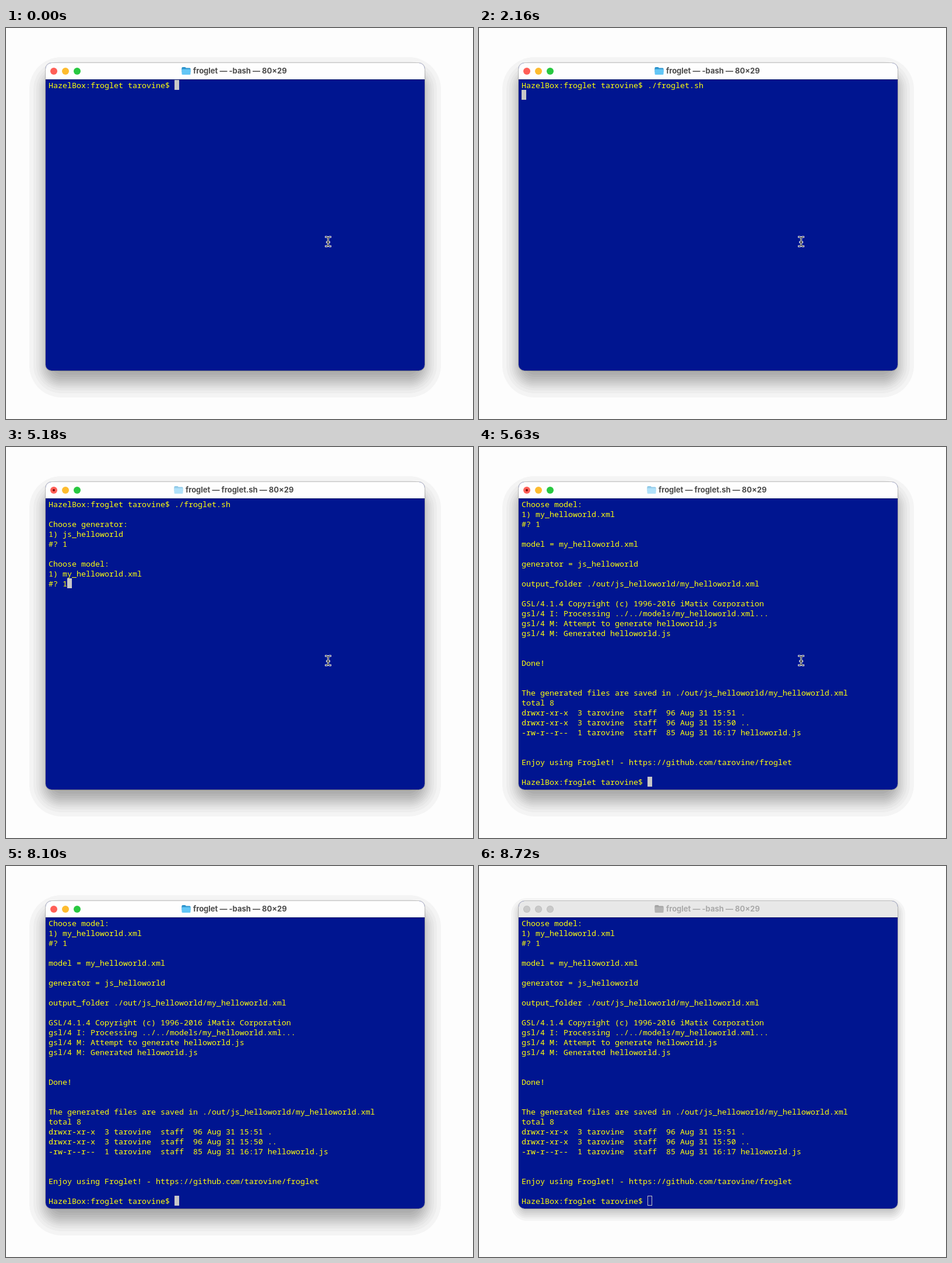
Recreate the animation shown at these times as an HTML page with a canvas. Size 801 by 670 pixels, loop 8820 ms.

```html
<!DOCTYPE html>
<html lang="en">
<head>
<meta charset="utf-8">
<title>Terminal session</title>
<style>
  html, body { margin: 0; width: 100%; height: 100%; overflow: hidden; background: #fdfdfd; }
  canvas { display: block; }
</style>
</head>
<body>
<canvas id="stage" width="801" height="670"></canvas>
<script>
const ctx = document.getElementById('stage').getContext('2d');
const LOOP = 8820, ROWS = 29, COL = 8, ROW = 17;
const WIN = { x: 68, y: 60, w: 650, h: 527, bar: 28, r: 10 };
const TEXT = { x: 73, y: 89 };
const PROMPT = 'HazelBox:froglet tarovine$ ';

// Text that reaches the terminal at each time
const OUTPUT = [
  [0, PROMPT],
  [720, '.'], [900, '/'], [1260, 'f'], [1440, 'r'], [1710, 'oglet.sh '],
  [2160, '\n'],
  [2250, '\nChoose generator:\n1) js_helloworld\n#? '],
  [3600, '1'],
  [4320, '\n\nChoose model:\n1) my_helloworld.xml\n#? '],
  [5180, '1'],
  [5630, `

model = my_helloworld.xml

generator = js_helloworld

output_folder ./out/js_helloworld/my_helloworld.xml

GSL/4.1.4 Copyright (c) 1996-2016 iMatix Corporation
gsl/4 I: Processing ../../models/my_helloworld.xml...
gsl/4 M: Attempt to generate helloworld.js
gsl/4 M: Generated helloworld.js


Done!


The generated files are saved in ./out/js_helloworld/my_helloworld.xml
total 8
drwxr-xr-x  3 tarovine  staff  96 Aug 31 15:51 .
drwxr-xr-x  3 tarovine  staff  96 Aug 31 15:50 ..
-rw-r--r--  1 tarovine  staff  85 Aug 31 16:17 helloworld.js


Enjoy using Froglet! - https://github.com/tarovine/froglet

${PROMPT}`],
];

function rounded(x, y, w, h, r) {
  ctx.beginPath();
  ctx.roundRect(x, y, w, h, r);
}

function disc(x, y, r, color) {
  ctx.beginPath();
  ctx.arc(x, y, r, 0, Math.PI * 2);
  ctx.fillStyle = color;
  ctx.fill();
}

// Stepped shadow: nested rounded boxes that darken inwards
function drawShadow(spreads, drop, corner, step) {
  spreads.forEach((s, i) => {
    const shade = 244 - i * step;
    rounded(WIN.x - s, WIN.y + drop - s, WIN.w + 2 * s, WIN.h + 2 * s, corner + s);
    ctx.fillStyle = `rgb(${shade},${shade},${shade})`;
    ctx.fill();
  });
}

function drawFolder(x, back, front) {
  ctx.fillStyle = back;
  rounded(x, 67, 7, 5, 1.5);
  ctx.fill();
  rounded(x, 68.5, 15, 8, 1.5);
  ctx.fill();
  ctx.fillStyle = front;
  rounded(x, 70.5, 15, 9.5, 1.5);
  ctx.fill();
}

function drawTitleBar(running, active) {
  const lights = active ? ['#ff5f57', '#febc2e', '#28c840'] : Array(3).fill('#c9c9c9');
  lights.forEach((color, i) => {
    disc(82 + 20 * i, 74, 6, active ? color : '#b9b9b9');
    if (!active) disc(82 + 20 * i, 74, 5.2, color);
  });
  if (running) disc(82, 74, 2, '#7c0808');

  const x = running ? 288.5 : 301.5;
  if (!active) drawFolder(x, '#a4a4a4', '#b4b4b4');
  else if (running) drawFolder(x, '#93cbe9', '#b0e1fa');
  else drawFolder(x, '#2d94cd', '#62c6f6');

  ctx.font = '700 13px Inter, sans-serif';
  ctx.fillStyle = active ? '#4b4b4b' : '#a9a9a9';
  ctx.fillText(`froglet — ${running ? 'froglet.sh' : '-bash'} — 80×29`, x + 19.5, 78);
}

function drawWindow(running, active) {
  rounded(WIN.x - 0.5, WIN.y - 0.5, WIN.w + 1, WIN.h + 1, WIN.r + 0.5);
  ctx.strokeStyle = 'rgba(0,0,0,.2)';
  ctx.lineWidth = 1;
  ctx.stroke();

  ctx.save();
  rounded(WIN.x, WIN.y, WIN.w, WIN.h, WIN.r);
  ctx.clip();
  ctx.fillStyle = '#001590';
  ctx.fillRect(WIN.x, WIN.y, WIN.w, WIN.h);
  ctx.fillStyle = active ? '#fefefe' : '#e8e8e8';
  ctx.fillRect(WIN.x, WIN.y, WIN.w, WIN.bar);
  ctx.fillStyle = 'rgba(0,0,0,.3)';
  ctx.fillRect(WIN.x, WIN.y + WIN.bar, WIN.w, 1);
  ctx.restore();
  drawTitleBar(running, active);
}

function drawTerminal(t, active) {
  const log = OUTPUT.filter(([at]) => t >= at).map(([, text]) => text).join('');
  const lines = log.split('\n').slice(-ROWS);
  const cursorX = TEXT.x + lines.at(-1).length * COL;
  const cursorY = TEXT.y + (lines.length - 1) * ROW;

  if (active) {
    ctx.fillStyle = '#c7c7c7';
    ctx.fillRect(cursorX, cursorY, COL, ROW);
  } else {
    ctx.strokeStyle = '#c7c7c7';
    ctx.lineWidth = 1;
    ctx.strokeRect(cursorX + 0.5, cursorY + 0.5, COL - 1, ROW - 1);
  }
  ctx.font = '500 13.333px "Noto Sans Mono", monospace';
  ctx.fillStyle = '#ffff0a';
  lines.forEach((line, i) => ctx.fillText(line, TEXT.x, TEXT.y + 14 + i * ROW));
}

const BEAM = new Path2D('M-4 -8H-2.5Q0 -8 0 -5.5V5.5Q0 8 -2.5 8H-4M4 -8H2.5Q0 -8 0 -5.5M4 8H2.5Q0 8 0 5.5M-2 1H2');
const ARROW = new Path2D('M0 0V15L3.5 11.8L6 17.5L8.4 16.5L6 11H10.5Z');

function drawPointer(t) {
  if (t >= 8100) return;
  // The pointer leaves towards the lower right in 90 ms steps
  const step = Math.max(0, Math.floor((t - 7560) / 90) + 1);
  const p = (step / 6) ** 2;
  const x = 552.5 + 187 * p, y = 366 + 292 * p;
  const inside = x < WIN.x + WIN.w && y < WIN.y + WIN.h;

  ctx.save();
  ctx.translate(x, y);
  ctx.lineJoin = 'round';
  ctx.lineCap = 'square';
  ctx.strokeStyle = '#fff';
  if (inside) {
    ctx.lineWidth = 2.8;
    ctx.stroke(BEAM);
    ctx.lineWidth = 1;
    ctx.strokeStyle = '#000';
    ctx.stroke(BEAM);
  } else {
    ctx.lineWidth = 2;
    ctx.stroke(ARROW);
    ctx.fillStyle = '#000';
    ctx.fill(ARROW);
  }
  ctx.restore();
}

function draw(t) {
  const running = t >= 2340 && t < 5720;
  const active = t < 8640;
  ctx.fillStyle = '#fdfdfd';
  ctx.fillRect(0, 0, 801, 670);
  if (t < 8720) drawShadow([28, 21, 16, 12, 9, 6, 3, 0, -3, -7, -11, -16], 18, 27, 7);
  else drawShadow([13, 9, 6, 3, 0, -3, -6], 8, 14, 8);
  drawWindow(running, active);
  drawTerminal(t, active);
  drawPointer(t);
}

const start = performance.now();
function tick() {
  draw((performance.now() - start) % LOOP);
  requestAnimationFrame(tick);
}
tick();
</script>
</body>
</html>
```
